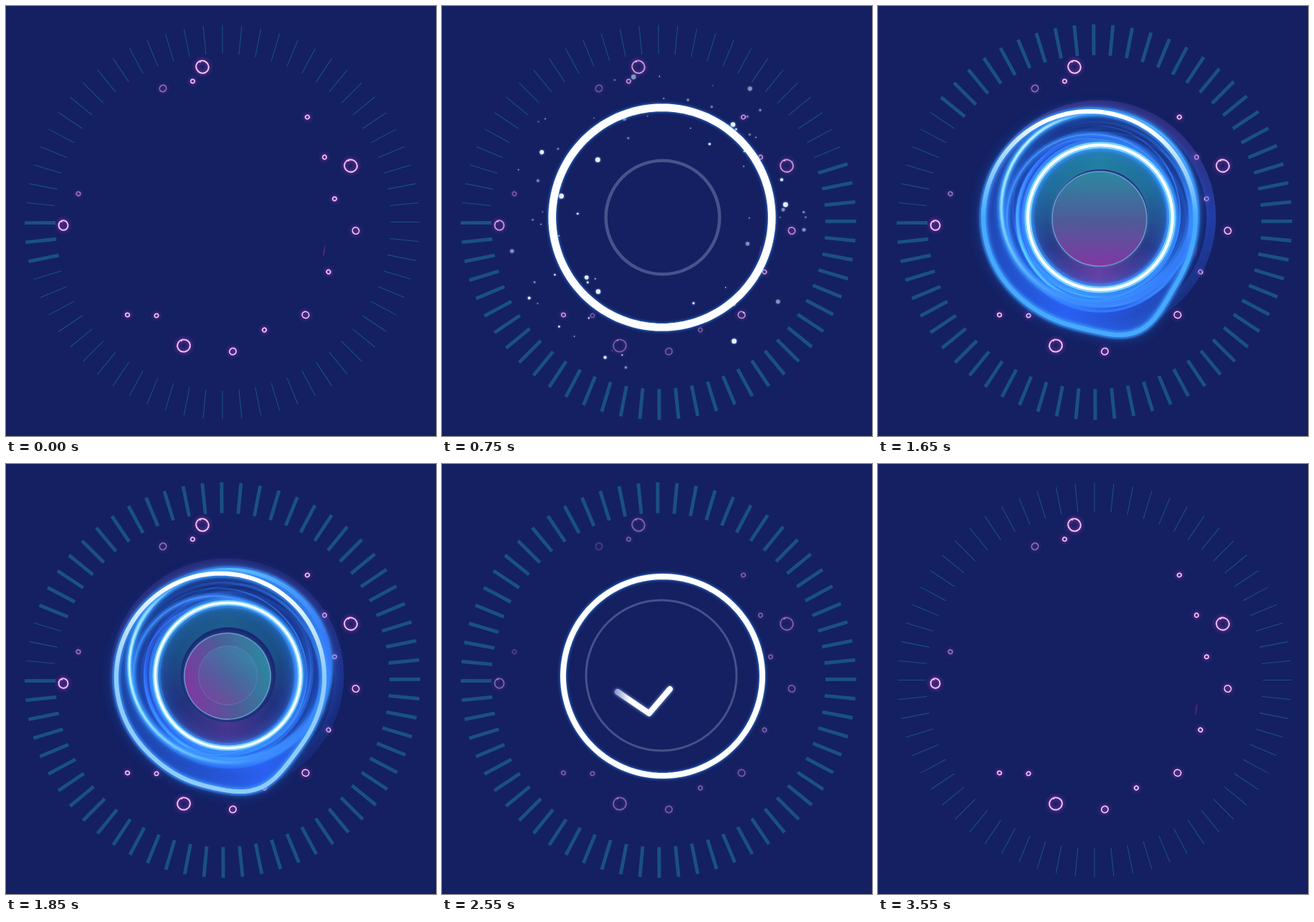
These frames come from a looping animation (600x600 px, 3600 ms). An HTML page with a canvas:

```html
<!DOCTYPE html>
<html lang="en">
<head>
<meta charset="utf-8">
<title>Energy ring loader</title>
<style>
  html, body { margin: 0; height: 100%; overflow: hidden; background: #142062; }
  canvas { display: block; width: 100vw; height: 100vh; }
</style>
</head>
<body>
<canvas id="stage" width="600" height="600"></canvas>
<script>
const ctx = document.getElementById('stage').getContext('2d');
const LOOP = 3600, TAU = Math.PI * 2, CX = 308, CY = 295;
let t = 0;

let seed = 11;
const random = () => (seed = seed * 16807 % 2147483647) / 2147483647;
const many = (count, make) => Array.from({ length: count }, make);

// Bubble centres by radius
const bubbles = {
  9: [[274, 85], [481, 223], [248, 474]],
  6.8: [[80, 306]],
  4.8: [[488, 313.5], [418, 431], [316.5, 482], [219, 115]],
  2.8: [[260.5, 105], [420.5, 155], [444.5, 211], [458.5, 269], [450, 371],
        [360.5, 452], [210, 432], [169.5, 431], [101, 262]]
};
const sparks = many(75, () => ({
  angle: random() * TAU, distance: 165 + 140 * random(),
  size: .7 + 3 * random() ** 2, alpha: random() < .4 ? .4 : .95
}));
const strands = many(9, () => ({
  phase: random() * TAU, radius: 106 + 34 * random(), shift: 14 * random(),
  width: 2 + 4 * random(), alpha: .2 + .25 * random()
}));

// Timing: span rises from 0 to 1, pulse rises and falls, pose blends the four main states
const mix = (a, b, u) => a + (b - a) * u;
const span = (from, to) => Math.min(1, Math.max(0, (t - from) / (to - from)));
const pulse = (a, b, c, d) => span(a, b) * (1 - span(c, d));
const pose = (burst, swirl, calm, done) =>
  mix(mix(mix(burst, swirl, span(1150, 1650)), calm, span(1650, 2150)), done, span(2150, 2450));
const easeOut = (u, power = 2) => 1 - (1 - u) ** power;

function layer(alpha, draw, mode = 'source-over') {
  if (alpha <= 0) return;
  ctx.save();
  ctx.globalAlpha = alpha;
  ctx.globalCompositeOperation = mode;
  draw();
  ctx.restore();
}

function oval(x, y, rx, ry = rx, tilt = 0) {
  const path = new Path2D();
  path.ellipse(x, y, rx, ry, tilt, 0, TAU);
  return path;
}

function glow(color, blur) {
  ctx.shadowColor = color;
  ctx.shadowBlur = blur;
}

function fill(path, color, rule) {
  ctx.fillStyle = color;
  ctx.fill(path, rule);
}

function stroke(path, color, width) {
  ctx.strokeStyle = color;
  ctx.lineWidth = width;
  ctx.stroke(path);
}

// Area covered by exactly one of two rings
function crescents(a, b, color) {
  const path = new Path2D(a);
  path.addPath(b);
  fill(path, color, 'evenodd');
}

function blend(gradient, colors) {
  colors.forEach((c, i) => gradient.addColorStop(i / (colors.length - 1), c));
  return gradient;
}
const sweep = (angle, ...colors) => blend(ctx.createConicGradient(angle, CX, CY), colors);
const slope = (x0, y0, x1, y1, ...colors) => blend(ctx.createLinearGradient(x0, y0, x1, y1), colors);

function drawTicks() {
  const filled = 64 * easeOut(span(-50, 2550), 2.2);
  const weight = 1 - span(2600, 2900);
  for (let i = 0; i < 64; i++) {
    const on = i < filled ? weight : 0, a = Math.PI - i * TAU / 64 - .004 * on;
    const tick = new Path2D();
    for (const r of [235 - 2 * on, 275 + on]) tick.lineTo(302 + r * Math.cos(a), 301.5 + r * Math.sin(a));
    stroke(tick, '#1a5084', 1.1 + 3.8 * on);
  }
}

function drawBubbles() {
  const level = 1 - .42 * pulse(0, 1150, 1150, 1600) - .6 * pulse(2200, 2500, 3300, 3500);
  const low = 1 - pulse(50, 350, 600, 900);
  for (const [size, centres] of Object.entries(bubbles)) {
    const r = +size;
    for (const [x, y] of centres) layer(level * (y > 431 ? low : 1) * (x < 240 && y < 270 ? .5 : 1), () => {
      glow('#d33fd0', 6);
      stroke(oval(x, y, r, r * .95, x), '#f3c3f5', r > 6 ? 2 : 1.7);
      if (r > 6) fill(oval(x - r * .35, y - r * .8, 1.3), '#f3c3f5');
    });
  }
  layer(.4 * level, () => fill(oval(444, 342, 1.3, 8, .15), '#a02a9a'));
}

function drawSparks(start, end, turn) {
  const reach = mix(.55, 1.13, easeOut(span(start, end)));
  const fade = pulse(start, start + 120, mix(start, end, .6), end);
  for (const s of sparks) layer(fade * s.alpha, () => {
    const a = s.angle + turn, r = s.distance * reach;
    glow('#8fbcff', 3);
    fill(oval(CX + r * Math.cos(a), CY + r * Math.sin(a), s.size), '#eef4ff');
  });
}

function mainRing() {
  const grow = easeOut(span(80, 340));
  const radius = grow * (pose(149, 148, 141, 139) + 8 * (1 - span(400, 1150))) + 10 * span(2980, 3350);
  const x = pose(307, 295, 305, 308), y = pose(295, 295, 302, 296);
  const bulge = pose(0, 20, 11, 0), heading = pose(1.2, 1.2, 1.6, 1.6);
  const path = new Path2D();
  for (let i = 0; i < 120; i++) {
    const a = i / 120 * TAU - Math.PI / 2;
    const bump = Math.exp(-(((a - heading) / .5) ** 2)) * (1 + .25 * Math.cos(6 * a - .6));
    const r = radius + bulge * bump;
    path.lineTo(x + r * Math.cos(a), y + r * Math.sin(a));
  }
  path.closePath();
  return path;
}

// Soft blue halo, bright line and white core
function neon(path, line, width, core = '#fff') {
  glow('#2f80ff', 18);
  stroke(path, '#2f78ff66', width * 2);
  glow('#48b4ff', 7);
  stroke(path, line, width);
  ctx.shadowBlur = 0;
  stroke(path, core, width * .45);
}

function drawSwirl(main, inner) {
  const power = pulse(1180, 1500, 2200, 2450), dense = 1 - span(1650, 2150);
  const heading = 1.9 - (t - 1650) * .0035;
  const middle = oval(pose(307, 307, 318, 318), 282, pose(135, 135, 146, 146), 134);
  const drift = oval(pose(298, 298, 282, 282), 295, pose(118, 118, 108, 108), pose(116, 116, 103, 103));
  const wash = sweep(heading, '#2b60f2', '#2552cc77', '#1c347f33', '#2552cc77', '#2b60f2');

  layer(power * dense, () => {
    stroke(oval(CX, CY, 157), sweep(0, '#2b51d099', '#23409a33', '#23409a00', '#7a3fa066', '#7a3fa044', '#2b51d099'), 13);
    stroke(oval(310, 294, 84), sweep(Math.PI / 2, '#703a9d', '#29357f', '#1f6f92', '#23839c', '#1f6f92', '#29357f', '#703a9d'), 36);
    crescents(middle, drift, wash);
  });
  layer(power, () => {
    fill(main, '#2c66d81c');
    crescents(main, middle, wash);
    crescents(inner, drift, wash);
    for (const s of strands) layer(power * s.alpha * mix(.5, 1, dense), () => {
      const a = s.phase + heading;
      const path = oval(CX + s.shift * Math.cos(a), CY + s.shift * Math.sin(a), s.radius, s.radius * .96, a);
      stroke(path, sweep(a, '#4bb4ff00', '#4bb4ff', '#2f62ff88', '#4bb4ff00'), s.width);
    }, 'lighter');
    neon(drift, '#3b7cff77', 4, '#6cc4ff66');
    neon(middle, sweep(heading, '#3f8cff', '#54bcff', '#6ee0ff', '#3878ff', '#3f8cff'), 6,
      sweep(heading, '#7fd0ff00', '#dff6ff', '#7fd0ff00', '#7fd0ff00'));
  });
}

function drawInnerRing(ring) {
  const lit = pulse(1150, 1550, 2200, 2450);
  layer(pose(.55, 1, 1, .27) * pulse(650, 850, 2550, 2800), () => {
    stroke(ring, '#cbd7f6', pose(4.5, 6, 4, 3));
    layer(lit, () => neon(ring, '#7fd4ff', pose(6, 9, 5, 4)));
  });
}

function drawMainRing(ring) {
  const cool = pose(0, 1, 0, 0);
  const tint = `rgb(${255 - 185 * cool},${255 - 85 * cool},255)`;
  layer(span(80, 110) * (1 - span(2980, 3350)), () => {
    const halo = pulse(1200, 1600, 2200, 2450);
    layer(halo * .8, () => neon(ring, '#3d8cff', 6));
    glow('#3793ff', 4);
    stroke(ring, sweep(0, tint, tint, tint, tint, '#fff', '#fff', tint), pose(mix(9.5, 12, span(400, 1150)), 6, 6, 8));
  });
}

function drawOrb() {
  const r = pose(50 * span(820, 1150), 66, 51, 0);
  if (r <= 0) return;
  layer(1, () => {
    ctx.translate(309, CY + pose(0, 2, 0, 0));
    ctx.rotate(pose(.3, 0, Math.PI, Math.PI));
    const ball = oval(0, 0, r), core = oval(-1, -1, r * pose(.54, .7, .66, .66));
    glow('#4860b0', 6);
    fill(ball, slope(0, -r, 0, r, '#2c88a2', '#4d5c99', '#8038a2'));
    ctx.shadowBlur = 0;
    stroke(ball, sweep(0, '#7886c9', '#a855c0', '#7886c9', '#55b0c8', '#7886c9'), 1.5);
    ctx.globalAlpha = pose(.85, 0, .75, .75);
    fill(core, slope(-r / 2, -r / 4, r / 2, r / 4, '#3d9cb8', '#4a70a8', '#87489f'));
    stroke(core, '#7f9ad0', 1.2);
  });
}

function drawCheck() {
  const length = 176 * span(2120, 2750) ** 1.55;
  layer(pulse(2100, 2400, 2980, 3300), () => {
    ctx.setLineDash([length + .1, 400]);
    ctx.lineCap = ctx.lineJoin = 'round';
    glow('#8aaeff', 4);
    stroke(new Path2D('M245 318L289 348L370 253'), slope(242, 0, 262, 0, '#8f9bca', '#fff'), 8);
  });
}

function draw(now) {
  t = now % LOOP;
  ctx.fillStyle = '#142062';
  ctx.fillRect(0, 0, 600, 600);
  drawTicks();
  drawBubbles();
  drawSparks(600, 1550, 0);
  drawSparks(2950, 3500, 1.9);
  const main = mainRing();
  const inner = oval(pose(308, 310, 309, 306), CY, pose(113, 101, 102, 105) * mix(.5, 1, span(650, 900)));
  drawSwirl(main, inner);
  drawInnerRing(inner);
  drawMainRing(main);
  drawOrb();
  drawCheck();
  requestAnimationFrame(draw);
}
requestAnimationFrame(draw);
</script>
</body>
</html>
```
